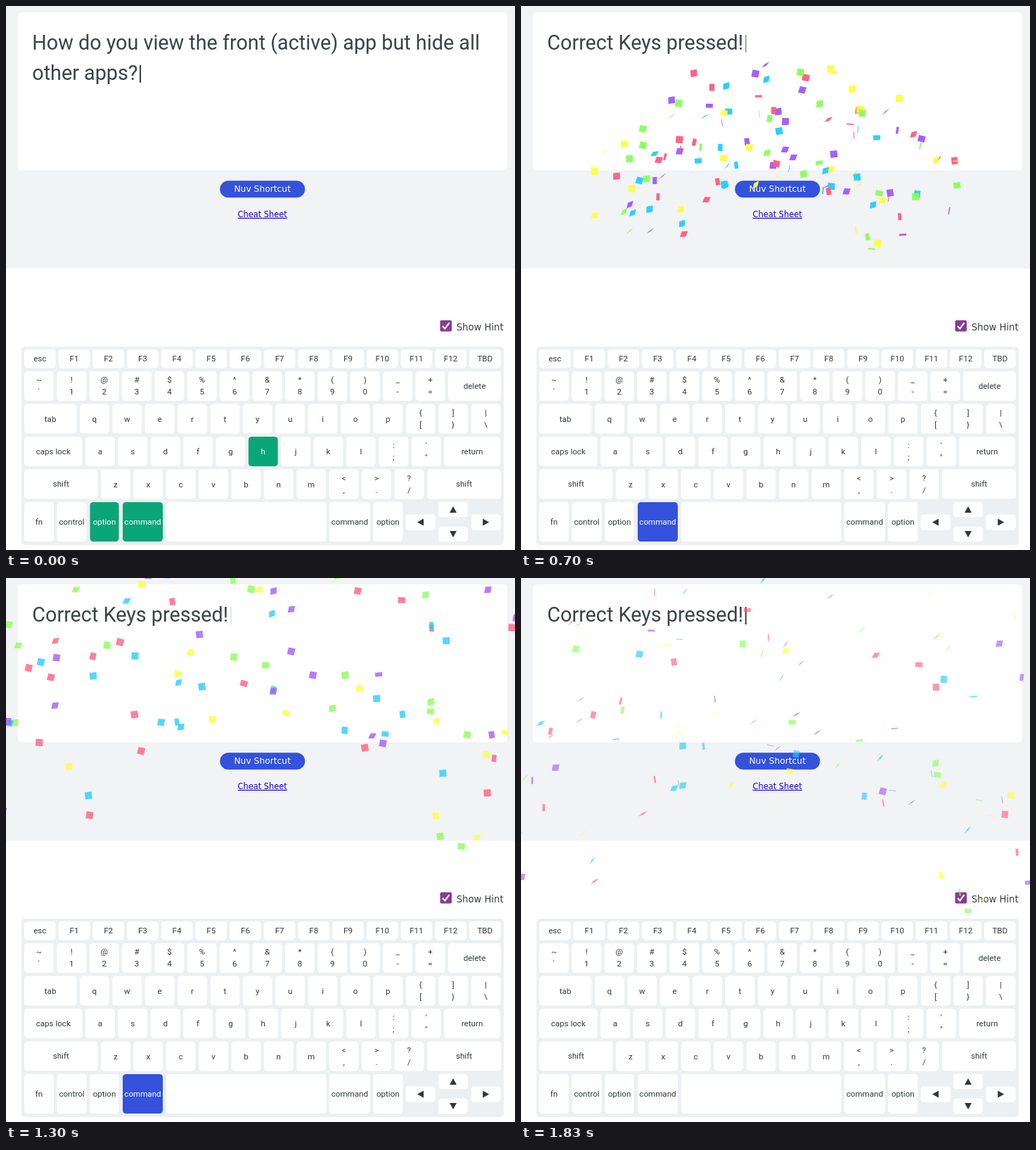
These frames come from a looping animation (724 px wide and 773 px high, 1970 ms). An HTML page with a canvas:

```html
<!DOCTYPE html>
<html lang="en">
<head>
<meta charset="utf-8">
<title>Shortcut practice</title>
<style>
  html, body { margin: 0; width: 100%; height: 100%; overflow: hidden; background: #fff; }
  svg, canvas { position: absolute; left: 0; top: 0; width: 724px; height: 773px; }
  .prompt { font: 28.75px Roboto, sans-serif; fill: #3b4346; white-space: pre; }
  .wide { font-family: "DejaVu Sans", sans-serif; }
  .key text { font: 11.6px Roboto, sans-serif; fill: #30383b; text-anchor: middle; }
  .key rect { fill: #fff; }
  .key path { fill: #30383b; }
  .key.hint rect { fill: #0aa678; }
  .key.down rect { fill: #3452db; }
  .key.hint text, .key.down text { fill: #fff; }
</style>
</head>
<body>
<svg viewBox="0 0 724 773">
  <rect width="724" height="373" fill="#f1f3f5"/>
  <rect x="17" y="9" width="696" height="224.5" rx="5" fill="#fff"/>
  <text class="prompt" x="37.3" y="61.5" id="line1"></text>
  <text class="prompt" x="37.3" y="104.7" id="line2"></text>
  <rect x="304.3" y="248.2" width="121" height="24" rx="12" fill="#3452db"/>
  <text class="wide" x="364.7" y="264.2" font-size="12.3" text-anchor="middle" fill="#fff">Nuv Shortcut</text>
  <text class="wide" x="364.7" y="300" font-size="11.4" text-anchor="middle" fill="#1a00d0" text-decoration="underline">Cheat Sheet</text>
  <rect x="617.5" y="446.5" width="16.5" height="16" rx="2" fill="#893a96"/>
  <path d="M621 455l3.3 3.5 6.2-8.3" fill="none" stroke="#fff" stroke-width="2.2"/>
  <text class="wide" x="640.7" y="461" font-size="13.2" fill="#3a3f42">Show Hint</text>
  <rect x="22" y="484" width="686" height="282" rx="5" fill="#edf0f2"/>
  <g id="keys"></g>
</svg>
<canvas id="confetti" width="724" height="773"></canvas>
<script>
const LOOP = 1970;
const $ = id => document.getElementById(id);

// Keyboard
function make(tag, attrs, parent, text = '') {
  const node = document.createElementNS('http://www.w3.org/2000/svg', tag);
  for (const name in attrs) node.setAttribute(name, attrs[name]);
  node.textContent = text;
  return parent.appendChild(node);
}

function key(label, x, y, width, height) {
  const group = make('g', { class: 'key' }, $('keys'));
  make('rect', { x, y, width, height, rx: 4.5 }, group);
  const cx = x + width / 2, cy = y + height / 2 + 4;
  if (/^[^a-z]{2}$/i.test(label)) {
    make('text', { x: cx, y: cy - 9 }, group, label[0]);
    make('text', { x: cx, y: cy + 8 }, group, label[1]);
  } else {
    make('text', { x: cx, y: cy }, group, label);
  }
  return group;
}

function row(labels, x, y, pitch = 46.38, width = 41.8, height = 42) {
  return labels.map((label, i) => key(label, x + i * pitch, y, width, height));
}

function arrowKey(angle, x, y, height) {
  const group = key('', x, y, 42, height);
  make('path', { d: 'M-5 4.5H5L0-4.5Z', transform: `translate(${x + 21} ${y + height / 2}) rotate(${angle})` }, group);
}

row('esc F1 F2 F3 F4 F5 F6 F7 F8 F9 F10 F11 F12 TBD'.split(' '), 26, 488, 48.69, 44.6, 26.5);
row('~` !1 @2 #3 $4 %5 ^6 &7 *8 (9 )0 _- +='.split(' '), 26, 519);
key('delete', 629, 519, 75, 42);
key('tab', 26, 565.5, 74.3, 42);
row([...'qwertyuiop', '{[', ']}', '|\\'], 105, 565.5);
key('caps lock', 26, 612, 82.5, 42);
const home = row([...'asdfghjkl', ':;', '\'"'], 113, 612);
key('return', 623.3, 612, 79.5, 42);
key('shift', 26, 658.5, 104.5, 41.7);
row([...'zxcvbnm', '<,', '>.', '?/'], 135, 658.5);
key('shift', 599, 658.5, 105, 41.7);
key('fn', 26, 705, 42, 56);
key('control', 72.5, 705, 42, 56);
const option = key('option', 119.5, 705, 41, 56);
const command = key('command', 166, 705, 57, 56);
key('', 227.8, 705, 227.7, 56);
key('command', 459.7, 705, 58.3, 56);
key('option', 522.3, 705, 42, 56);
arrowKey(-90, 568.5, 722.3, 22.4);
arrowKey(0, 615, 704.7, 21.5);
arrowKey(180, 615, 739.8, 21.5);
arrowKey(90, 661.7, 722.3, 22.4);
const letterH = home[5];

// Confetti
let seed = 20;
function random() {
  seed = (seed + 0x6D2B79F5) | 0;
  let n = Math.imul(seed ^ (seed >>> 15), seed | 1);
  n ^= n + Math.imul(n ^ (n >>> 7), n | 61);
  return ((n ^ (n >>> 14)) >>> 0) / 4294967296;
}
const COLORS = ['#26ccff', '#a25afd', '#ff5e7e', '#88ff5a', '#fcff42'];
const AXES = [0, Math.PI / 2, Math.PI / 4, Math.PI / 4];
const pieces = Array.from({ length: 130 }, (_, i) => ({
  color: COLORS[i % COLORS.length],
  angle: Math.PI * (0.5 + (random() - 0.5) * 0.76),
  speed: 31 + random() * 36,
  wobble: random() * 10,
  axis: AXES[Math.floor(random() * AXES.length)],
  phase: (random() - 0.5) * 1.6,
  tilt: (random() - 0.4) * 0.45
}));
const ctx = $('confetti').getContext('2d');

function drawConfetti(time) {
  ctx.clearRect(0, 0, 724, 773);
  if (time < 700) return;
  const tick = (time - 585) / 17.2;
  ctx.globalAlpha = 1 - tick / 200;
  for (const p of pieces) {
    const reach = p.speed * 10 * (1 - 0.9 ** tick);
    const sway = 0.1 * tick + p.wobble;
    const squeeze = Math.max(0.1, Math.abs(Math.cos((tick - 42) * 0.067 + p.phase)) ** 1.6);
    ctx.save();
    ctx.translate(362 + 0.92 * reach * Math.cos(p.angle) + 9 * Math.cos(sway),
                  386 - reach * Math.sin(p.angle) + 2.9 * tick + 4 * Math.sin(sway));
    ctx.rotate(p.tilt + p.axis);
    ctx.scale(squeeze, 1);
    ctx.rotate(-p.axis);
    ctx.fillStyle = p.color;
    ctx.fillRect(-5, -5, 10, 10);
    ctx.restore();
  }
}

// Prompt with a softly blinking caret
function write(line, text, caret) {
  line.textContent = text;
  if (caret !== undefined) make('tspan', { 'fill-opacity': caret }, line, '|');
}

function render(time) {
  const correct = time >= 700;
  const caret = (0.5 + 0.5 * Math.cos((time - 940) / 950 * 2 * Math.PI)).toFixed(3);
  if (correct) {
    write($('line1'), 'Correct Keys pressed!', caret);
    write($('line2'), '');
  } else {
    write($('line1'), 'How do you view the front (active) app but hide all');
    write($('line2'), 'other apps?', caret);
  }
  const setKey = (node, from, to) => {
    const down = time >= from && time < to;
    node.setAttribute('class', 'key' + (down ? ' down' : correct ? '' : ' hint'));
  };
  setKey(option, 500, 700);
  setKey(command, 500, 1500);
  setKey(letterH, 600, 700);
  drawConfetti(time);
}

let shown = -1;
function frame() {
  const t = performance.now() % LOOP;
  const step = t >= 1830 ? 1830 : Math.min(1700, Math.floor(t / 100) * 100);
  if (step !== shown) render(shown = step);
  requestAnimationFrame(frame);
}
frame();
</script>
</body>
</html>
```
